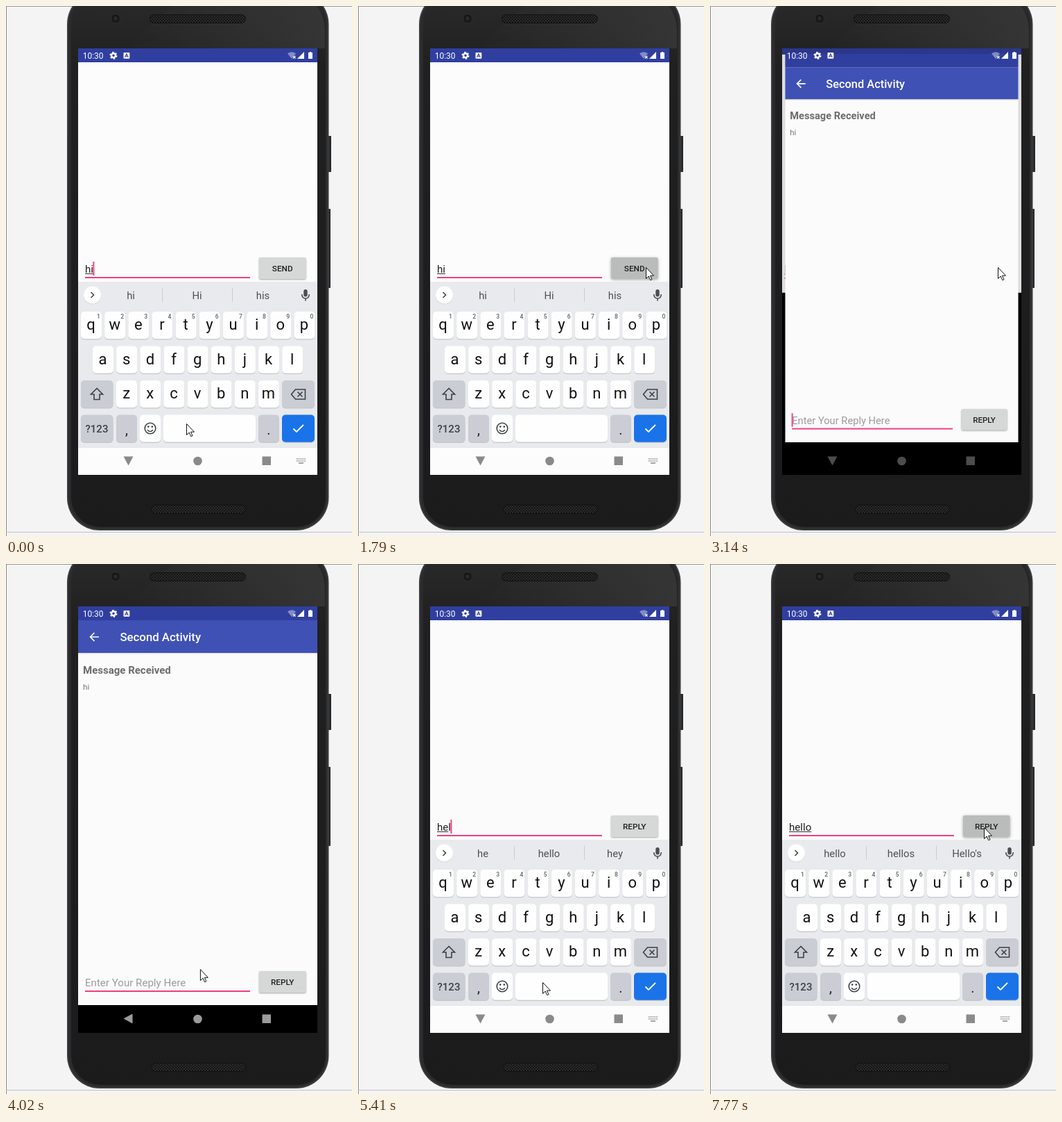
Animation, 499 px wide and 763 px high, one loop 8 s. Source, as an HTML page:

```html
<!DOCTYPE html>
<html lang="en">
<head>
<meta charset="utf-8">
<title>Two activities</title>
<style>
  html, body { margin: 0; width: 100%; height: 100%; overflow: hidden; background: #f4f4f4; }
  svg { display: block; width: 100%; height: 100%; font-family: Roboto, sans-serif; }
  .mid { text-anchor: middle; }
</style>
</head>
<body>
<svg viewBox="0 0 499 763">
  <defs>
    <linearGradient id="face" x1="0" y1="0" x2="0" y2="1">
      <stop offset="0" stop-color="#2a2a2b"/>
      <stop offset=".14" stop-color="#202021"/>
      <stop offset="1" stop-color="#1b1b1c"/>
    </linearGradient>
    <linearGradient id="sheen">
      <stop offset="0" stop-color="#3a3a3a" stop-opacity="0"/>
      <stop offset="1" stop-color="#3a3a3a" stop-opacity=".75"/>
    </linearGradient>
    <pattern id="mesh" width="4" height="4" patternUnits="userSpaceOnUse">
      <rect width="4" height="4" fill="#2c2c2c"/>
      <circle cx="1" cy="1" r="1" fill="#0c0c0c"/>
      <circle cx="3" cy="3" r="1" fill="#0c0c0c"/>
    </pattern>
    <clipPath id="screen"><rect x="104" y="61" width="345" height="614"/></clipPath>
  </defs>

  <rect width="499" height="763" fill="#f4f4f4"/>
  <rect width="499" height="1" fill="#9a9a9a"/>
  <rect width="1" height="763" fill="#8a8a8a"/>
  <rect y="757" width="499" height="1" fill="#c0c0c0"/>

  <g id="phone">
    <rect x="464" y="187" width="5" height="52" rx="1" fill="#2a2b2c"/>
    <rect x="464" y="292" width="4" height="114" rx="1" fill="#2a2b2c"/>
    <rect x="88" y="-21" width="377.500" height="776" rx="47" fill="#3b3d3f"/>
    <rect x="90" y="-19" width="373.500" height="772" rx="45" fill="#2a2b2d"/>
    <rect x="94" y="-17" width="367" height="767" rx="42" fill="url(#face)"/>
    <path d="M170 61L240 0H448Q460 14 460 40V61Z" fill="url(#sheen)"/>
    <circle cx="158" cy="18" r="6.500" fill="#171718" stroke="#303031"/>
    <circle cx="158" cy="18" r="3" fill="#29292d"/>
    <rect x="207.500" y="12.500" width="138" height="12" rx="6" fill="url(#mesh)" stroke="#111"/>
    <rect x="209.500" y="718.500" width="136" height="12" rx="6" fill="url(#mesh)" stroke="#111"/>
  </g>

  <g clip-path="url(#screen)">
    <rect x="104" y="61" width="345" height="614"/>
    <g id="first"></g>
    <g id="second"></g>
    <rect x="104" y="635" width="345" height="40"/>
    <g id="keyboard"></g>
    <g id="nav">
      <path id="back" d="M-7 0L6 -7V7Z"/>
      <circle cx="276.500" cy="655" r="6.300"/>
      <rect x="369.500" y="648.500" width="12.500" height="12.500" rx=".5"/>
    </g>
    <g id="navKeys" fill="none" stroke="#8e8e8e" stroke-width="1.600">
      <path d="M419 652H432M419 655H432" stroke-dasharray="1.700 1.100"/>
      <path d="M422 658H429"/>
    </g>
    <rect id="statusBar" x="104" y="61" width="345" height="20" fill="#303f9f"/>
    <g fill="#fff">
      <text x="110.800" y="75.700" font-size="11.900">10:30</text>
      <circle cx="155" cy="71.300" r="3" fill="none" stroke="#fff" stroke-width="2.400"/>
      <circle cx="155" cy="71.300" r="4.700" fill="none" stroke="#fff" stroke-width="1.600" stroke-dasharray="2.460"/>
      <rect x="169.500" y="67" width="8.800" height="8.800" rx="1"/>
      <path d="M171.500 74L173.900 68.800L176.300 74M172.500 72.300H175.300" fill="none" stroke="#303f9f" stroke-width="1.100"/>
      <path d="M406 68.500Q412 64 418 68.500L412 76Z" opacity=".4"/>
      <path d="M414 72L417.500 75.500M417.500 72L414 75.500" stroke="#fff" stroke-width="1.100"/>
      <path d="M430 66V76H420Z"/>
      <path d="M436 67H437.700V66H440.300V67H442V76H436Z"/>
    </g>
  </g>
  <path id="mouse" d="M.5 .5V16.500L4.200 13L6.700 18.700L9 17.700L6.500 12.200H11.500Z" fill="#fff" stroke="#111"/>
</svg>

<script>
const LOOP = 8000;
const $ = id => document.getElementById(id);

function set(e, attrs) {
  for (const k in attrs) e.setAttribute(k, attrs[k]);
}
function add(parent, tag, attrs = {}, text) {
  const e = document.createElementNS('http://www.w3.org/2000/svg', tag);
  set(e, attrs);
  if (text !== undefined) e.textContent = text;
  return parent.appendChild(e);
}
const rect = (p, x, y, width, height, fill, rx = 0) =>
  add(p, 'rect', { x, y, width, height, fill, rx });
const dot = (p, cx, cy, r, fill) => add(p, 'circle', { cx, cy, r, fill });
const label = (p, x, y, size, fill, text, more = {}) =>
  add(p, 'text', { x, y, 'font-size': size, fill, ...more }, text);
const centred = (p, x, y, size, fill, text, weight = 400) =>
  label(p, x, y, size, fill, text, { class: 'mid', 'font-weight': weight });
const line = (p, d, stroke = '#5f6368', width = 1.6) =>
  add(p, 'path', { d, fill: 'none', stroke, 'stroke-width': width });
const ring = (p, cx, cy, r, stroke) =>
  add(p, 'circle', { cx, cy, r, fill: 'none', stroke, 'stroke-width': 1.6 });
const show = (e, on) => set(e, { visibility: on ? 'visible' : 'hidden' });

// Input line with a button, at its place above the keyboard
function makeForm(parent, caption) {
  const g = add(parent, 'g');
  const text = label(g, 114, 384, 15.1, '#212121', '');
  const under = rect(g, 114, 385, 0, 1, '#333');
  const caret = rect(g, 125, 368, 2, 20, '#f53f7d');
  rect(g, 114, 390, 238, 2, '#ee3f7b');
  const face = rect(g, 365, 362, 67.5, 31, '#d6d7d7', 2);
  centred(g, 398.7, 382, 11.75, '#202020', caption, 500);
  return {
    g,
    draw(value, marked, caretOn, press, hint = '') {
      text.textContent = value || hint;
      set(text, { fill: value ? '#212121' : '#9b9b9b' });
      set(under, { width: marked ? text.getSubStringLength(0, marked) : 0 });
      set(caret, { x: 113.4 + (value ? text.getComputedTextLength() : 0) });
      show(caret, caretOn);
      const c = Math.round(214 - 28 * press);
      set(face, { fill: `rgb(${c},${c + 1},${c + 1})` });
      face.style.filter = `drop-shadow(0 1px ${1 + press}px rgba(0,0,0,.35))`;
    }
  };
}

// First activity
const first = $('first');
rect(first, 104, 81, 345, 330, '#fcfcfc');
const sendForm = makeForm(first, 'SEND');
rect(first, 104, 61, 345, 20, '#303f9f');
const dim = rect(first, 90, 40, 380, 371, '#000');

// Second activity
const second = $('second');
rect(second, 104, 81, 345, 554, '#fbfbfb');
const page = add(second, 'g');
rect(page, 104, 128, 345, 1.5, '#e3e3e3');
rect(page, 104, 81, 345, 47, '#3f51b5');
line(page, 'M134 105H122M127.500 99L121.500 105L127.500 111', '#fff', 1.7);
label(page, 164.4, 111, 16.8, '#fff', 'Second Activity', { 'font-weight': 500 });
label(page, 111, 158, 15, '#6d6d6d', 'Message Received', { 'font-weight': 700 });
label(page, 111, 181, 11.75, '#757575', 'hi');
const replyForm = makeForm(page, 'REPLY');
set(replyForm.g, { transform: 'translate(0 224)' });
rect(second, 104, 61, 345, 20, '#303f9f');

// Keyboard
const kb = $('keyboard');
rect(kb, 104, 397, 345, 238, '#e8eaed');
rect(kb, 104, 635, 345, 40, '#fcfcfc');
rect(kb, 104, 635, 345, 1, '#e4e4e6');

const INK = '#3c4043', GREY = '#cbcdd4', WHITE = '#fefefe';
const rowTop = i => 440 + 49.5 * i;
function key(x, row, w, fill = WHITE) {
  rect(kb, x, rowTop(row) + 1, w, 39.5, '#c3c5c9', 5);
  rect(kb, x, rowTop(row), w, 39.3, fill, 5);
}
['qwertyuiop', 'asdfghjkl', 'zxcvbnm'].forEach((letters, row) => {
  const left = 123 + 17 * row + (row === 2 ? 17 : 0);
  [...letters].forEach((ch, i) => {
    const x = left + 34.15 * i;
    key(x - 15, row, 30);
    centred(kb, x - .4, rowTop(row) + 26, 22, '#111', ch);
    if (row === 0) centred(kb, x + 10.5, 450.3, 8.6, '#5f6368', (i + 1) % 10, 500);
  });
});
for (const row of [2, 3]) key(108, row, 46.5, GREY);
for (const x of [159, 364]) key(x, 3, 30, GREY);
key(398, 2, 47, GREY);
key(193, 3, 30);
key(227, 3, 133);
key(398, 3, 47, '#1a73e8');
line(kb, 'M131 550.500L122.500 559H127V566.500H135V559H139.500Z', INK);
line(kb, 'M417.500 552H431.500V566H417.500L411.500 559ZM420.500 555.500L427.500 562.500M427.500 555.500L420.500 562.500', INK);
centred(kb, 131, 613.5, 15, INK, '?123', 500);
centred(kb, 174, 616.5, 20, '#222', ',');
centred(kb, 379, 616.5, 20, '#222', '.');
ring(kb, 208, 608, 7.8, INK);
line(kb, 'M204 610.200Q208 615 212 610.200', INK, 1.4);
for (const x of [205.2, 210.8]) dot(kb, x, 605.6, 1.3, INK);
line(kb, 'M414.500 608.500L419 613L429 603', '#fff', 1.8);

// Strip above the keys: word offers or tools
dot(kb, 124.5, 416.8, 12.8, '#d6d8db');
dot(kb, 124.5, 416, 12.5, '#fff');
const chevron = line(kb, 'M-2 -4L2 0L-2 4', '#444');
rect(kb, 429.3, 408, 5.4, 10.5, '#4a4d51', 2.7);
line(kb, 'M426.700 415Q427 421 432 421T437.300 415M432 421V424.500', '#4a4d51');

const words = add(kb, 'g');
const slots = [180, 275.5, 370.5].map(x => centred(words, x, 422, 14.8, '#4d5156', ''));
for (const x of [225, 326]) rect(words, x, 406, 1, 20, '#c9cbcf');

const tools = add(kb, 'g');
ring(tools, 169.5, 414.5, 4.6, '#5f6368');
line(tools, 'M173 418L178.500 423.500');
line(tools, 'M214.500 410H227.500V418L222.500 423.500H214.500ZM227 418H222.500V423M217.500 417Q219.500 420 222 417.500M217.500 413.500H219M223 413.500H224.500');
centred(tools, 270, 420.8, 11.5, '#5f6368', 'GIF', 900);
line(tools, 'M314.500 410.500H326.500V423.500H314.500ZM318 410V412.500H323V409H318ZM317.500 415.500H323.500M317.500 418H323.500M317.500 420.500H321.500');
rect(tools, 351, 406, 1, 20, '#d3d5d8');
for (const i of [-1, 0, 1]) dot(tools, 381.5 + 5 * i, 416.5, 1.7, '#5f6368');

// Timing
const SEND_DOWN = 1670, SEND_UP = 2880, OPEN = 3140, REPLY_DOWN = 7770;
const WORD = 'hello', WORD_DONE = 6100;
const keyTimes = [5160, 5280, 5410, 5670, 5810];
const offers = ['', 'h hi he', 'he hello hey', 'hel hello help', "hell hello he'll", "hello hellos Hello's"];

// Mouse strokes: start, end, x, y
const strokes = [
  [280, 520, 345, 619], [520, 880, 445, 406], [880, 1300, 415, 376], [3510, 4020, 280, 583],
  [4020, 4260, 266, 602], [6260, 7110, 391, 387], [7110, 7500, 395, 379]
];

const ramp = (t, a, b) => Math.min(1, Math.max(0, (t - a) / (b - a)));
const easeOut = p => p * (2 - p);
const lerp = (a, b, p) => a + (b - a) * p;
const zoom = s => `translate(276.5 368) scale(${s}) translate(-276.5 -368)`;

function mouseAt(t) {
  let x = 260, y = 601;
  for (const [a, b, toX, toY] of strokes) {
    const p = easeOut(ramp(t, a, b));
    x = lerp(x, toX, p);
    y = lerp(y, toY, p);
  }
  return `translate(${x} ${y})`;
}

function draw(t) {
  const opened = t >= OPEN;
  const open = ramp(t, OPEN, OPEN + 240);
  const rise = opened ? ramp(t, 4680, 5110) : 1;
  const pan = ramp(t, 4920, 5160);
  const count = keyTimes.filter(k => k <= t).length;
  const marked = t >= WORD_DONE ? count : Math.max(0, count - 1);
  const press = t < SEND_UP ? ramp(t, SEND_DOWN - 80, SEND_DOWN + 100) : ramp(t, REPLY_DOWN - 50, REPLY_DOWN);

  // the caret blinks from the latest key or focus
  const since = count ? keyTimes[count - 1] : opened ? OPEN : -90;
  const clicked = opened ? t >= REPLY_DOWN : t >= SEND_DOWN;
  const caretOn = !clicked && Math.floor((t - since) / 490) % 2 === 0;

  sendForm.draw('hi', 2, !opened && caretOn, opened ? 0 : press);
  replyForm.draw(WORD.slice(0, count), marked, opened && caretOn, opened ? press : 0, 'Enter Your Reply Here');

  show(first, open < 1);
  show(second, opened);
  show($('statusBar'), !opened || open === 1);
  set(first, { transform: zoom(opened ? 1.04 : 1) });
  set(second, { transform: zoom(lerp(.974, 1, open)) });
  set(page, { transform: `translate(0 ${-224 * pan})` });
  set(dim, { opacity: opened ? .12 : 0 });

  set(kb, { transform: `translate(0 ${238 * (1 - rise)})`, opacity: rise });
  const choices = opened ? offers[marked] : 'hi Hi his';
  show(words, choices);
  show(tools, !choices);
  slots.forEach((s, i) => { s.textContent = choices.split(' ')[i] || ''; });
  set(chevron, { transform: `translate(124.5 416) scale(${choices ? 1 : -1} 1)` });

  const grey = Math.round(opened ? lerp(lerp(76, 155, open), 138, pan) : 138);
  set($('nav'), { fill: `rgb(${grey},${grey},${grey})` });
  set($('back'), { transform: `translate(176.5 654.5) rotate(${-90 * (1 - open + pan)})` });
  set($('navKeys'), { opacity: rise });
  set($('mouse'), { transform: mouseAt(t) });
}

const start = performance.now();
function tick() {
  draw((performance.now() - start) % LOOP);
  requestAnimationFrame(tick);
}
tick();
</script>
</body>
</html>
```
